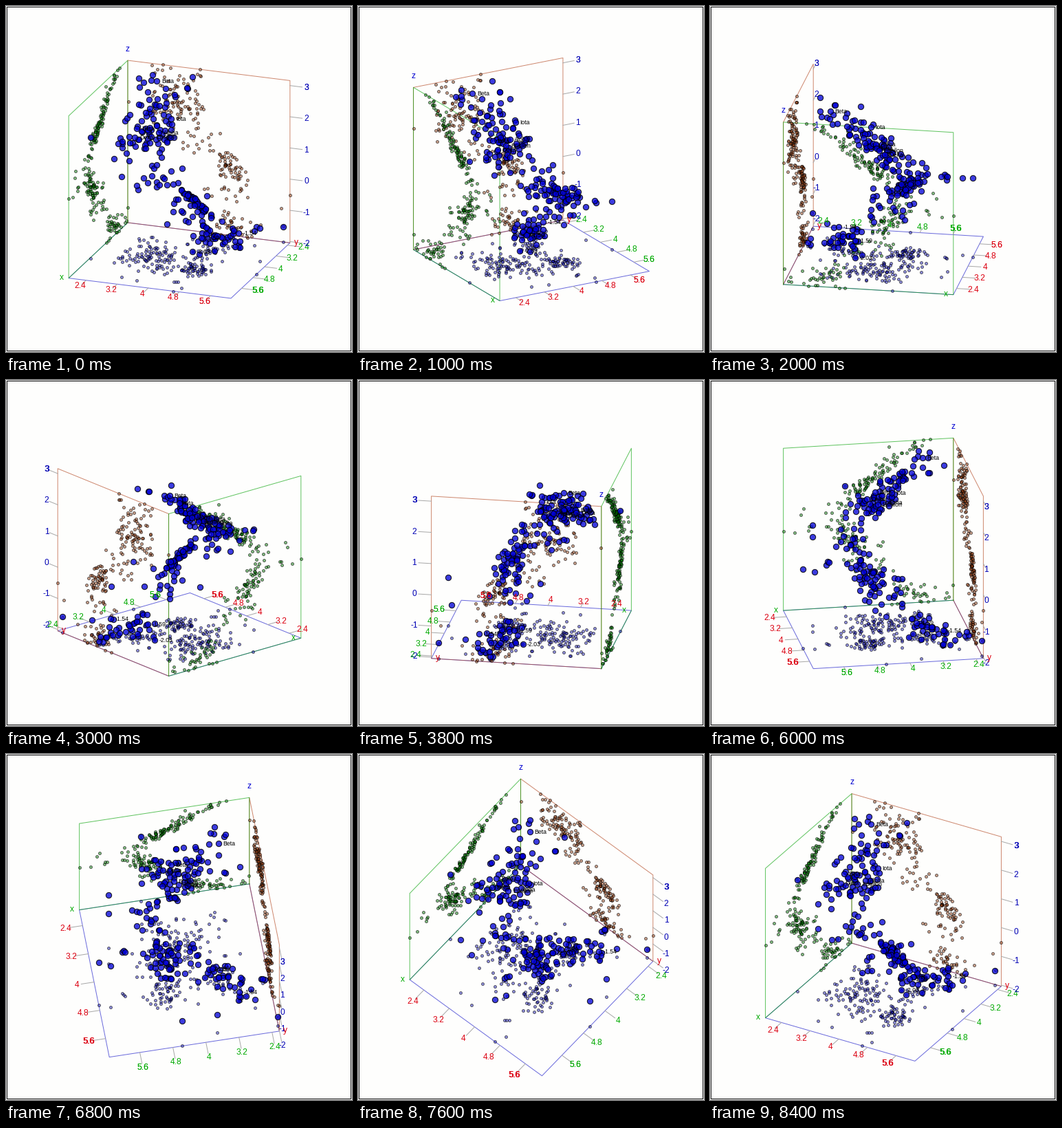
Recreate the animation shown at these times as a matplotlib script. Size 503x503 px, loop 8600 ms.

```python
import numpy as np
import matplotlib.pyplot as plt
from matplotlib.animation import FuncAnimation

SIZE, DPI = 503, 100
MID, EDGE = 251.5, 251.0      # cube centre and side, in pixels
FRAMES, STEP = 43, 200
PX = 72 / DPI
RED, GREEN, BLUE = "#dc0010", "#00aa00", "#0000b4"

rng = np.random.default_rng(5)

LABELLED = [
    ("Beta", .263, .229, .986), ("Iota", .428, .438, .845),
    ("Alpha", .367, .480, .763), ("Beta", .240, .504, .784),
    ("Epsilon", .329, .504, .741), ("Delta", .245, .552, .746),
    ("-2.03", .520, .329, .000), ("-1.59", .570, .320, .087),
    ("-1.54", .755, .194, .096),
]
OUTLIERS = [
    (1, .57, .294), (.96, .004, .096), (.645, 1, .488), (.672, .934, .475),
    (.384, .898, .584), (.281, .88, .619), (.945, .357, .205),
    (.82, .11, .09), (.004, .64, .746), (.428, .378, .969),
]


def near(centre, n, spread):
    return np.array(centre) + rng.normal(0, spread, (n, 3))


def make_points():
    norm, uni = rng.normal, rng.uniform
    # upper sheet: height falls along y
    n = 84
    y = rng.triangular(.12, .52, .69, n)
    upper = [uni(.15, .47, n), y,
             np.minimum(1.14 - .75 * y + norm(0, .025, n), 1)]
    # bend between the two sheets
    n = 16
    bend = [uni(.32, .58, n), uni(.56, .76, n), uni(.48, .64, n)]
    # dense slanted band
    n = 48
    x, y = norm(.635, .05, n), np.clip(norm(.62, .07, n), .42, .76)
    band = [x, y, .464 - .6885 * x + .639 * y + norm(0, .011, n)]
    n = 16
    loose = [uni(.47, .7, n), uni(.4, .66, n), uni(.2, .4, n)]
    # foot of the cloud
    n = 32
    x = uni(.52, .78, n)
    y = .62 - .57 * x + norm(0, .05, n)
    foot = [x, y, np.clip(.3 * y + norm(0, .035, n), 0, 1)]
    groups = [np.column_stack(g) for g in (upper, bend, band, loose, foot)]
    groups += [near((.604, .849, .498), 3, .012), near((.65, .045, .02), 3, .014)]
    groups += [np.array(OUTLIERS, float), np.array([p[1:] for p in LABELLED])]
    return np.vstack(groups)


def camera(k):
    """Azimuth and elevation: a turn, a tilt up, a turn, a tilt down."""
    azim = 20 - 10 * min(k, 30) - 10 * min(max(k - 34, 0), 5)
    elev = 20 + 10 * min(max(k - 30, 0), 4) - 10 * max(k - 39, 0)
    return np.radians(azim), np.radians(elev)


def project(pts, k):
    a, e = camera(k)
    x, y, z = (np.atleast_2d(pts) - .5).T
    depth = x * np.sin(a) + y * np.cos(a)
    return np.column_stack([
        MID + EDGE * (x * np.cos(a) - y * np.sin(a)),
        MID + EDGE * (depth * np.sin(e) - z * np.cos(e))])


fig = plt.figure(figsize=(SIZE / DPI, SIZE / DPI), dpi=DPI, facecolor="white")
ax = fig.add_axes([0, 0, 1, 1])
ax.set_xlim(0, SIZE)
ax.set_ylim(SIZE, 0)
ax.axis("off")
for inset, color in ((1, "black"), (2, "#fefefd")):
    ax.add_patch(plt.Rectangle((inset, inset), SIZE - 2 * inset, SIZE - 2 * inset,
                               fc=color, lw=0))

lines, dots, texts = [], [], []


def add_line(pts, color, alpha=1):
    art, = ax.plot([], [], color=color, alpha=alpha, lw=PX, zorder=2)
    lines.append((art, np.array(pts, float)))


def add_dots(pts, size, fill, edge, width, z):
    art = ax.scatter(pts[:, 0], pts[:, 1], s=(size * PX) ** 2, facecolors=[fill],
                     edgecolors=[edge], linewidths=width * PX, zorder=z)
    dots.append((art, pts))


def add_text(s, pt, color, px, shift=(0, 0), ha="center", z=6):
    art = ax.text(0, 0, s, color=color, fontsize=px * PX, ha=ha, va="center",
                  family="Liberation Sans", zorder=z)
    texts.append((art, np.array(pt, float), np.array(shift) + (0.5, 1)))


def add_ticks(values, pos, start, axis, out, color, fmt):
    """Ticks along one axis, pointing along `out`."""
    for v in values:
        p = np.array(start, float)
        p[axis] = pos(v)
        tip, spot = p.copy(), p.copy()
        tip[out] += .075
        spot[out] += .1
        add_line([p, tip], "#a8a8a8")
        add_text(fmt(v), spot, color, 12)
    add_text(fmt(values[-1]), spot, color, 12, (.5, 0))   # last one is heavier


def flat(pts, axis):
    wall = pts.copy()
    wall[:, axis] = 0
    return wall


cloud = make_points()

# floor and two walls
for axis, color in ((2, "#1010c8"), (1, "#b04018"), (0, "#00a000")):
    square = np.insert([[0, 0], [0, 1], [1, 1], [1, 0], [0, 0]], axis, 0, axis=1)
    add_line(square, color, .62)

RIM = (0, 0, 0, .55)
add_dots(flat(cloud, 2), 4, (.1, .1, .75, .48), RIM, 1, 3)
add_dots(flat(cloud, 1), 4, (.6, .25, .08, .48), RIM, 1, 3)
add_dots(flat(cloud, 0), 4, (0, .5, 0, .48), RIM, 1, 3)
add_dots(cloud, 8.3, (0, 0, .84, .77), (0, 0, 0, .9), 1, 4)

steps = [2.4, 3.2, 4, 4.8, 5.6]
short = "{:g}".format
add_ticks(steps, lambda v: .107 + (v - 2.4) * .2397, (0, 1, 0), 0, 1, RED, short)
add_ticks(steps, lambda v: .043 + (v - 2.4) * .243, (1, 0, 0), 1, 0, GREEN, short)
add_ticks(range(-2, 4), lambda v: (v + 2.04) / 5.2, (1, 0, 0), 2, 0, BLUE, str)

add_text("x", (0, 1, 0), GREEN, 12, (-10.5, -1))
add_text("y", (1, 0, 0), RED, 12, (9, -1))
add_text("z", (0, 0, 1), "#0000d0", 12, (0, -17))
for name, *pt in LABELLED:
    add_text(name, pt, "black", 8.8, (6.5, 0), "left", 7)


def draw(k):
    for art, pts in lines:
        art.set_data(*(project(pts, k) + .5).T)
    for art, pts in dots:
        art.set_offsets(project(pts, k) + .5)
    for art, pt, shift in texts:
        art.set_position(project(pt, k)[0] + shift)
    return []


anim = FuncAnimation(fig, draw, frames=FRAMES, interval=STEP,
                     repeat=True, repeat_delay=0, blit=False)
plt.show()
```
